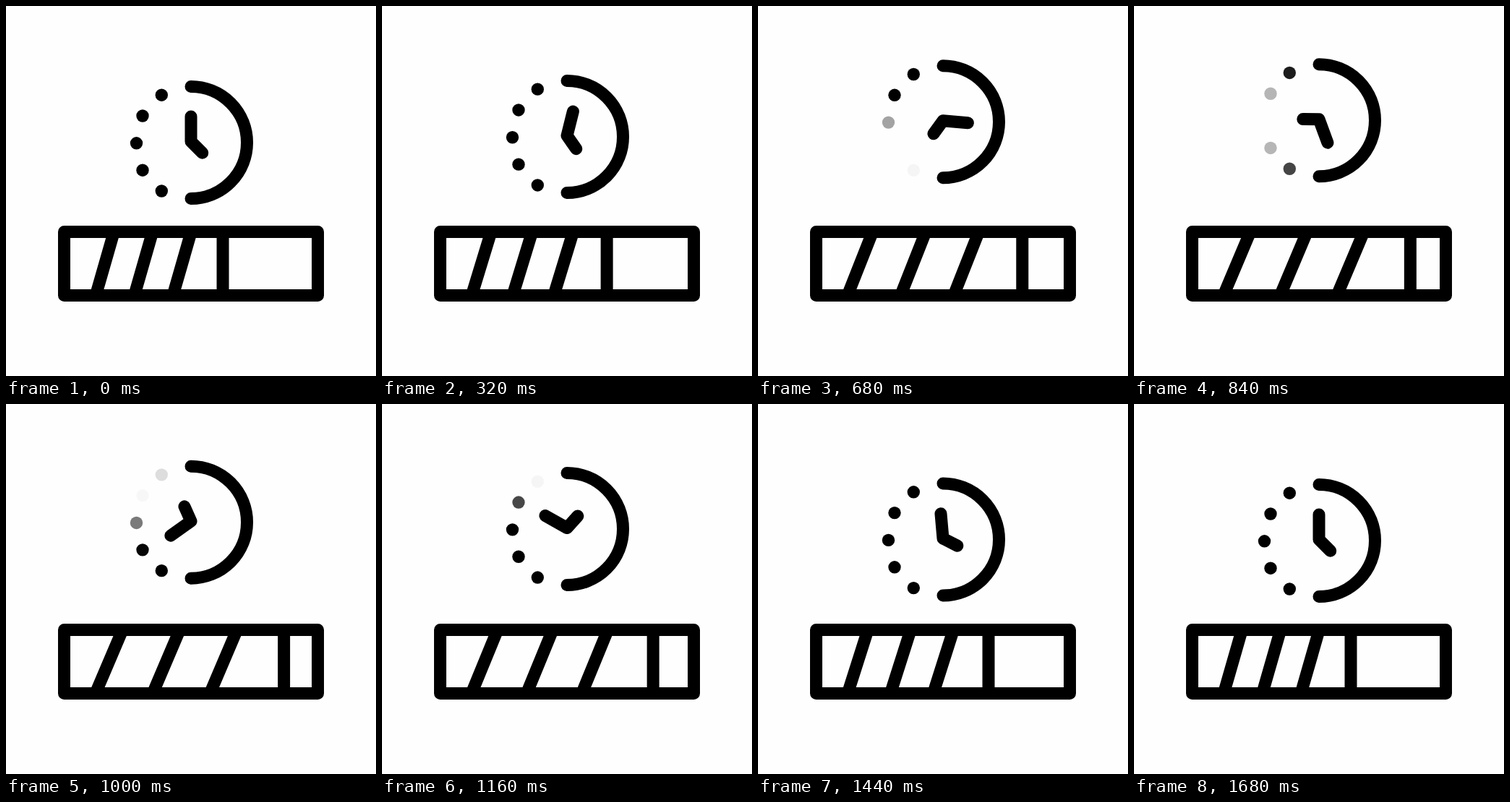
These frames come from a looping animation (512 px wide and 512 px high, 1.72 s). An HTML page:

```html
<!DOCTYPE html>
<html lang="en">
<head>
<meta charset="utf-8">
<title>Loading time</title>
<style>
  html, body { margin: 0; width: 100%; height: 100%; overflow: hidden; background: #fefefe; }
  svg { display: block; width: 100%; height: 100%; }
</style>
</head>
<body>
<svg viewBox="0 0 512 512" fill="none" stroke="#000" stroke-width="17">
  <g id="clock">
    <path d="M256 111.5A77.5 77.5 0 0 1 256 266.5" stroke-linecap="round"/>
    <path id="hands" stroke-linecap="round" stroke-linejoin="round"/>
    <g id="dots" fill="#000" stroke="none">
      <circle cx="215.3" cy="123.2" r="8.7"/>
      <circle cx="189" cy="152" r="8.7"/>
      <circle cx="180.5" cy="189.8" r="8.7"/>
      <circle cx="189" cy="227.2" r="8.7"/>
      <circle cx="215.3" cy="256" r="8.7"/>
    </g>
  </g>
  <path id="stripes"/>
  <rect x="80.5" y="312.5" width="351" height="88" stroke-linejoin="round"/>
</svg>
<script>
const LOOP = 1720, STEP = 40;
const $ = id => document.getElementById(id);
const clock = $('clock'), hands = $('hands'), stripes = $('stripes');
const dots = [...$('dots').children];

const ramp = (t, a, b) => Math.min(1, Math.max(0, (t - a) / (b - a)));
const ease = (t, a, b) => { const u = ramp(t, a, b); return u * u * (3 - 2 * u); };
const pulse = (t, a, b, c, d) => ease(t, a, b) - ease(t, c, d);

// Monotone cubic curve through [time, value] keys
function curve(keys) {
  const n = keys.length;
  const rise = i => (keys[i + 1][1] - keys[i][1]) / (keys[i + 1][0] - keys[i][0]);
  const slope = keys.map((_, i) => {
    if (i === 0 || i === n - 1) return 0;
    const a = rise(i - 1), b = rise(i);
    return a * b > 0 ? 2 * a * b / (a + b) : 0;
  });
  return t => {
    if (t <= keys[0][0]) return keys[0][1];
    if (t >= keys[n - 1][0]) return keys[n - 1][1];
    let i = 0;
    while (t > keys[i + 1][0]) i++;
    const [t0, v0] = keys[i], [t1, v1] = keys[i + 1];
    const h = t1 - t0, u = (t - t0) / h, w = 1 - u;
    return v0 * w * w * (1 + 2 * u) + v1 * u * u * (3 - 2 * u)
      + h * u * w * (slope[i] * w - slope[i + 1] * u);
  };
}

const minute = curve([[80, 0], [320, 14], [680, 95], [1000, 234.5], [1160, 299.5], [1440, 355], [1560, 360]]);
const hour = curve([[80, 0], [320, 10], [680, 81], [1000, 201], [1160, 267], [1440, 342], [1640, 360]]);

// Per dot: end of fading out, start of fading in
const fades = [[1027, 1152], [900, 994], [755, 880], [640, 775], [530, 672]];

function tip(deg, len) {
  const a = deg * Math.PI / 180;
  return `${(256 + len * Math.sin(a)).toFixed(2)} ${(187.5 - len * Math.cos(a)).toFixed(2)}`;
}

function draw(t) {
  clock.setAttribute('transform', `translate(0 ${(-31 * pulse(t, 80, 800, 800, 1535)).toFixed(2)})`);
  hands.setAttribute('d', `M${tip(minute(t), 34.5)}L256 187.5L${tip(135 + hour(t), 22.2)}`);

  dots.forEach((dot, i) => {
    const [out, back] = fades[i];
    dot.setAttribute('opacity', (1 - ramp(t, out - 210, out) + ramp(t, back, back + 230)).toFixed(3));
  });

  // The fill stretches sideways from x = 125, line weight unchanged
  const k = 1 + 84.6 * pulse(t, 145, 915, 1040, 1617) / 175;
  const x = v => (125 + (v - 125) * k).toFixed(2);
  let d = `M${x(300)} 313V399`;
  for (let i = 0; i < 3; i++) {
    const shift = i * 53.4;
    d += `M${x(149.3 + shift)} 313L${x(124.6 + shift)} 399`;
  }
  stripes.setAttribute('d', d);
}

const start = performance.now();
function tick() {
  const t = (performance.now() - start) % LOOP;
  draw(Math.floor(t / STEP) * STEP);
  requestAnimationFrame(tick);
}
tick();
</script>
</body>
</html>
```
